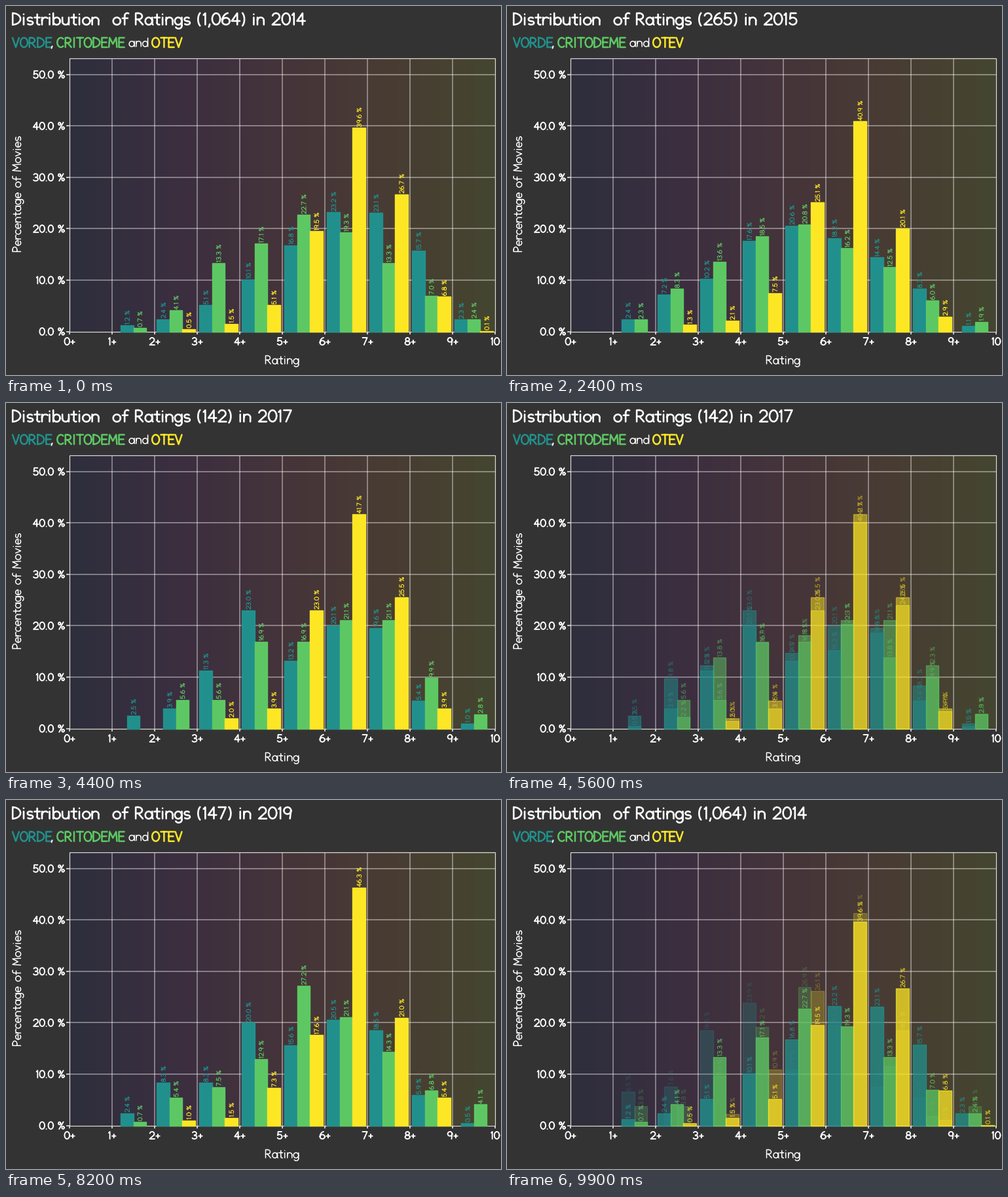
A matplotlib script for the animation above (10 s loop, 756x564 px).

```python
import numpy as np
import matplotlib.pyplot as plt
from matplotlib.animation import FuncAnimation
from matplotlib.collections import LineCollection, PathCollection
from matplotlib.colors import LinearSegmentedColormap
from matplotlib.path import Path

W, H, DPI = 756, 564, 100
PX = 72 / DPI                       # points per pixel
LEFT, RIGHT, TOP, BASE = 97, 747, 79.5, 497.5
STEP, UNIT = 65, 7.855              # pixels per rating, per percent
TEAL, GREEN, YELLOW = COLORS = ["#21908c", "#5dc863", "#fde725"]

YEARS = range(2014, 2021)
COUNTS = [1064, 265, 173, 142, 138, 147, 52]
HOLD = 10
FADES = [5, 5, 5, 4, 4, 4, 4]

# One row per year, one value per rating from 1+ to 9+ (0 means no bar).
FIRST = [
    [1.2, 2.4, 5.1, 10.1, 16.8, 23.2, 23.1, 15.7, 2.3],
    [2.4, 7.2, 10.2, 17.6, 20.6, 18.2, 14.4, 8.3, 1.1],
    [1.3, 9.2, 11.8, 13.9, 17.6, 19.7, 16.8, 9.2, 0.4],
    [2.5, 3.9, 11.3, 23.0, 13.2, 20.1, 19.6, 5.4, 1.0],
    [0.5, 9.8, 12.3, 20.1, 14.7, 15.2, 18.6, 8.3, 0.5],
    [2.4, 8.3, 8.3, 20.0, 15.6, 20.5, 18.5, 5.9, 0.5],
    [6.5, 7.6, 18.5, 23.9, 10.9, 19.6, 7.6, 5.4, 0],
]
SECOND = [
    [0.7, 4.1, 13.3, 17.1, 22.7, 19.3, 13.3, 7.0, 2.4],
    [2.3, 8.3, 13.6, 18.5, 20.8, 16.2, 12.5, 6.0, 1.9],
    [1.2, 5.2, 13.9, 16.8, 19.7, 19.7, 13.3, 8.7, 1.7],
    [0, 5.6, 5.6, 16.9, 16.9, 21.1, 21.1, 9.9, 2.8],
    [0, 2.2, 13.8, 16.7, 18.1, 20.3, 13.8, 12.3, 2.9],
    [0.7, 5.4, 7.5, 12.9, 27.2, 21.1, 14.3, 6.8, 4.1],
    [3.8, 3.8, 9.6, 19.2, 26.9, 19.2, 11.5, 1.9, 3.8],
]
THIRD = [
    [0, 0.5, 1.5, 5.1, 19.5, 39.6, 26.7, 6.8, 0.1],
    [0, 1.3, 2.1, 7.5, 25.1, 40.9, 20.1, 2.9, 0],
    [0, 0, 0.8, 5.0, 19.3, 44.1, 26.5, 4.2, 0],
    [0, 0, 2.0, 3.9, 23.0, 41.7, 25.5, 3.9, 0],
    [0, 0, 1.5, 5.4, 25.5, 40.2, 24.0, 3.4, 0],
    [0, 1.0, 1.5, 7.3, 17.6, 46.3, 21.0, 5.4, 0],
    [0, 0, 2.2, 10.9, 26.1, 41.3, 18.5, 1.1, 0],
]


# Handwritten lettering: pen strokes on a grid with cap height 10.
def line(*xy):
    return np.reshape(xy, (-1, 2)).astype(float)


def arc(cx, cy, rx, ry, start=0, end=360):
    a = np.radians(np.linspace(start, end, 21))
    return np.column_stack([cx + rx * np.cos(a), cy + ry * np.sin(a)])


# Each glyph is its advance followed by its strokes.
DIGITS = {
    "0": (8.6, arc(3.6, 5, 3.5, 5)),
    "1": (4.6, line(.4, 8.4, 1.9, 10, 1.9, 0)),
    "2": (8.6, arc(3.4, 7, 3.1, 3, 165, -35), line(5.94, 5.28, .2, 0, 7, 0)),
    "3": (8.6, arc(3.1, 7.5, 2.9, 2.5, 150, -90),
          arc(3.1, 2.5, 3.4, 2.5, 90, -150)),
    "4": (8.6, line(4.8, 0, 4.8, 10, 0, 3.2, 7, 3.2)),
    "5": (8.6, line(6, 10, 1.2, 10, .8, 5.2),
          arc(3.2, 3.1, 3.3, 3.1, 137, -150)),
    "6": (8.6, arc(3.5, 3, 3.3, 3), arc(6.2, 3, 6, 7.2, 180, 100)),
    "7": (8.6, line(.2, 10, 6.6, 10, 2.2, 0)),
    "8": (8.6, arc(3.5, 7.6, 2.6, 2.4), arc(3.5, 2.6, 3.3, 2.6)),
    "9": (8.6, arc(3.4, 7, 3.1, 3), line(6.5, 7, 5.6, 0)),
}
MARKS = {
    " ": (5.4,),
    ".": (3.4, line(.8, .1, .9, .1)),
    ",": (3.2, line(1.2, .4, .4, -2)),
    "%": (9, arc(1.7, 8, 1.6, 1.8), arc(6.6, 2, 1.6, 1.8),
          line(7, 10, 1.2, 0)),
    "+": (7, line(.4, 4, 5.4, 4), line(2.9, 6.5, 2.9, 1.5)),
    "(": (4.8, arc(4.4, 4.6, 4, 6.8, 125, 235)),
    ")": (4.2, arc(-1.6, 4.6, 4, 6.8, 55, -55)),
}
ROUND = {
    "a": (8, arc(3.1, 3.1, 3, 3.2), line(6.2, 6.3, 6.2, .6, 6.8, 0)),
    "b": (8, line(.4, 10, .4, 0), arc(3.4, 3.1, 3, 3.2)),
    "c": (7, arc(3.3, 3.1, 3.1, 3.2, 45, 315)),
    "d": (8, arc(3.1, 3.1, 3, 3.2), line(6.2, 10, 6.2, 0)),
    "e": (7.6, line(.3, 3.2, 6.2, 3.2), arc(3.2, 3.1, 3, 3.2, 0, 315)),
    "g": (8, arc(3.1, 3.1, 3, 3.2), line(6.2, 6.3, 6.2, -1),
          arc(3.4, -1, 2.8, 2.5, 0, -150)),
    "o": (8, arc(3.3, 3.1, 3.2, 3.2)),
    "s": (6.6, arc(2.8, 4.7, 2.3, 1.6, 40, 270),
          arc(2.8, 1.55, 2.5, 1.55, 90, -140)),
}
STEMS = {
    "f": (6, arc(4.4, 7.6, 2.3, 2.5, 60, 180), line(2.1, 7.6, 2.1, 0),
          line(.2, 5.6, 4.8, 5.6)),
    "i": (3.8, line(1, 6.3, 1, 0), line(1, 9, 1, 9.1)),
    "n": (7.8, line(.4, 6.3, .4, 0), arc(3.2, 3.7, 2.8, 2.6, 180, 0),
          line(6, 3.7, 6, 0)),
    "r": (6, line(.4, 6.3, .4, 0), arc(3.4, 3.4, 3, 2.9, 180, 50)),
    "t": (6.2, line(2.4, 9, 2.4, 1.6), arc(4, 1.6, 1.6, 1.6, 180, 290),
          line(0, 6.2, 4.8, 6.2)),
    "u": (8, line(.4, 6.3, .4, 2.6), arc(3.2, 2.6, 2.8, 2.6, 180, 360),
          line(6, 6.3, 6, 0)),
    "v": (7.2, line(.2, 6.3, 2.9, 0, 5.6, 6.3)),
}
BOWL = [line(.4, 0, .4, 10, 2.6, 10), arc(2.6, 7.3, 3.4, 2.7, 90, -90),
        line(2.6, 4.6, .4, 4.6)]
CAPS = {
    "C": (8.4, arc(4, 5, 3.8, 5, 50, 310)),
    "D": (9, line(.4, 0, .4, 10), arc(.4, 5, 6.8, 5, 90, -90)),
    "E": (7.4, line(6, 10, .4, 10, .4, 0, 6, 0), line(.4, 5.2, 5.2, 5.2)),
    "I": (3.6, line(.9, 10, .9, 0)),
    "M": (10.6, line(.4, 0, 1.2, 10, 4.6, 3.4, 8, 10, 8.8, 0)),
    "O": (9.2, arc(3.9, 5, 3.8, 5)),
    "P": (7.8, *BOWL),
    "R": (8.6, *BOWL, line(2.6, 4.6, 6.6, 0)),
    "T": (8, line(0, 10, 7, 10), line(3.5, 10, 3.5, 0)),
    "V": (8.2, line(0, 10, 3.4, 0, 6.8, 10)),
}
GLYPHS = DIGITS | MARKS | ROUND | STEMS | CAPS


def lettering(x, y, text, size, align=0, upright=False):
    """Path of a text whose baseline starts at (x, y); size is the cap height."""
    scale = size / 10
    pen = -align * (sum(GLYPHS[c][0] for c in text) - 1.6)
    parts = []
    for char in text:
        advance, *strokes = GLYPHS[char]
        for s in strokes:
            u, v = (s[:, 0] + pen) * scale, s[:, 1] * scale
            pts = (x - v, y - u) if upright else (x + u, y - v)
            parts.append(Path(np.column_stack(pts)))
        pen += advance
    return Path.make_compound_path(*parts)


fig = plt.figure(figsize=(W / DPI, H / DPI), dpi=DPI, facecolor="#333333")
ax = fig.add_axes([0, 0, 1, 1])
ax.axis("off")


def write(paths, color="white", width=1.5):
    pens = PathCollection(paths, facecolors="none", edgecolors=color,
                          linewidths=width * PX, capstyle="round",
                          joinstyle="round", zorder=7)
    pens.set_snap(False)
    return ax.add_collection(pens, autolim=False)


def rules(segments, color, width, z, alpha=1):
    ax.add_collection(LineCollection(segments, colors=color, alpha=alpha,
                                     linewidths=width * PX, zorder=z),
                      autolim=False)


def draw_frame():
    shades = ["#2e2f3c", "#3b2e40", "#45343a", "#493c33", "#444630"]
    cmap = LinearSegmentedColormap.from_list("panel", shades)
    ax.imshow(np.linspace(0, 1, 650)[None], cmap=cmap, aspect="auto",
              extent=[LEFT, RIGHT, BASE, TOP], zorder=0)
    xs = [LEFT + STEP * k for k in range(11)]
    ys = [BASE - UNIT * p for p in range(0, 51, 10)]
    rules([[(x, TOP), (x, BASE)] for x in xs[1:-1]]
          + [[(LEFT, y), (RIGHT, y)] for y in ys[1:]], "white", 2, 1, .38)
    rules([[(LEFT, TOP), (RIGHT, TOP), (RIGHT, BASE), (LEFT, BASE),
            (LEFT, TOP)]], "#dcdcdc", 1.2, 2)
    rules([[(x, BASE), (x, BASE + 4.5)] for x in xs]
          + [[(LEFT - 5, y), (LEFT, y)] for y in ys], "#e8e8e8", 1.6, 2)

    ticks = [lettering(x, 518, f"{k}+" if k < 10 else "10", 11, .5)
             for k, x in enumerate(xs)]
    ticks += [lettering(88, y + 5.5, f"{10 * k:.1f} %", 11, 1)
              for k, y in enumerate(ys)]
    write(ticks, width=1.9)
    write([lettering(421.5, 547, "Rating", 12.5, .5),
           lettering(22.5, 288, "Percentage of Movies", 12.5, .5, True)])

    write([lettering(10, 63, "VORDE", 14.5)], TEAL, 2.5)
    write([lettering(69, 62, ",", 13)], width=2)
    write([lettering(78, 63, "CRITODEME", 14.5)], GREEN, 2.5)
    write([lettering(188, 62, "and", 13)])
    write([lettering(223, 63, "OTEV", 14.5)], YELLOW, 2.5)


def draw_year(i):
    """Bars, labels and title of one year; present bars are centred per rating."""
    bars, labels, colors = [], [], []
    width = .9 * STEP / 3
    for k, values in enumerate(zip(FIRST[i], SECOND[i], THIRD[i]), start=1):
        shown = [(v, c) for v, c in zip(values, COLORS) if v]
        x = LEFT + STEP * (k + .5) - width * len(shown) / 2
        for value, color in shown:
            y = BASE - UNIT * value
            bars.append(Path([(x, BASE), (x, y), (x + width, y),
                              (x + width, BASE), (x, BASE)], closed=True))
            labels.append(lettering(x + width / 2 + 3.6, y - 1.6,
                                    f"{value:.1f} %", 6.7, 0, True))
            colors.append(color)
            x += width
    cols = PathCollection(bars, facecolors=colors, edgecolors=colors,
                          linewidths=1.4 * PX)
    ax.add_collection(cols, autolim=False)
    title = f"Distribution  of Ratings ({COUNTS[i]:,}) in {YEARS[i]}"
    return (cols, write(labels, colors, 1.05),
            write([lettering(9.5, 28.5, title, 17.5)], width=2.6))


draw_frame()
years = [draw_year(i) for i in range(len(YEARS))]
ax.set_xlim(0, W)
ax.set_ylim(H, 0)


def phase(frame):
    """Current year index and progress of the fade to the next one."""
    for i, fade in enumerate(FADES):
        if frame < HOLD:
            return i, 0
        frame -= HOLD
        if frame < fade:
            return i, (frame + 1) / fade
        frame -= fade


def update(frame):
    now, t = phase(frame)
    after = (now + 1) % len(years)
    alphas = {now: 1 - t, after: t}
    named = after if t > .5 else now
    for i, (cols, labels, title) in enumerate(years):
        alpha = alphas.get(i, 0)
        for z, part in ((3, cols), (5, labels)):
            part.set_visible(alpha > 0)
            part.set_alpha(alpha)
            part.set_zorder(z + (i == after))
        title.set_visible(i == named)
    return []


anim = FuncAnimation(fig, update, frames=100, interval=100,
                     init_func=lambda: update(0), repeat=True,
                     repeat_delay=0, blit=False)
plt.show()
```
